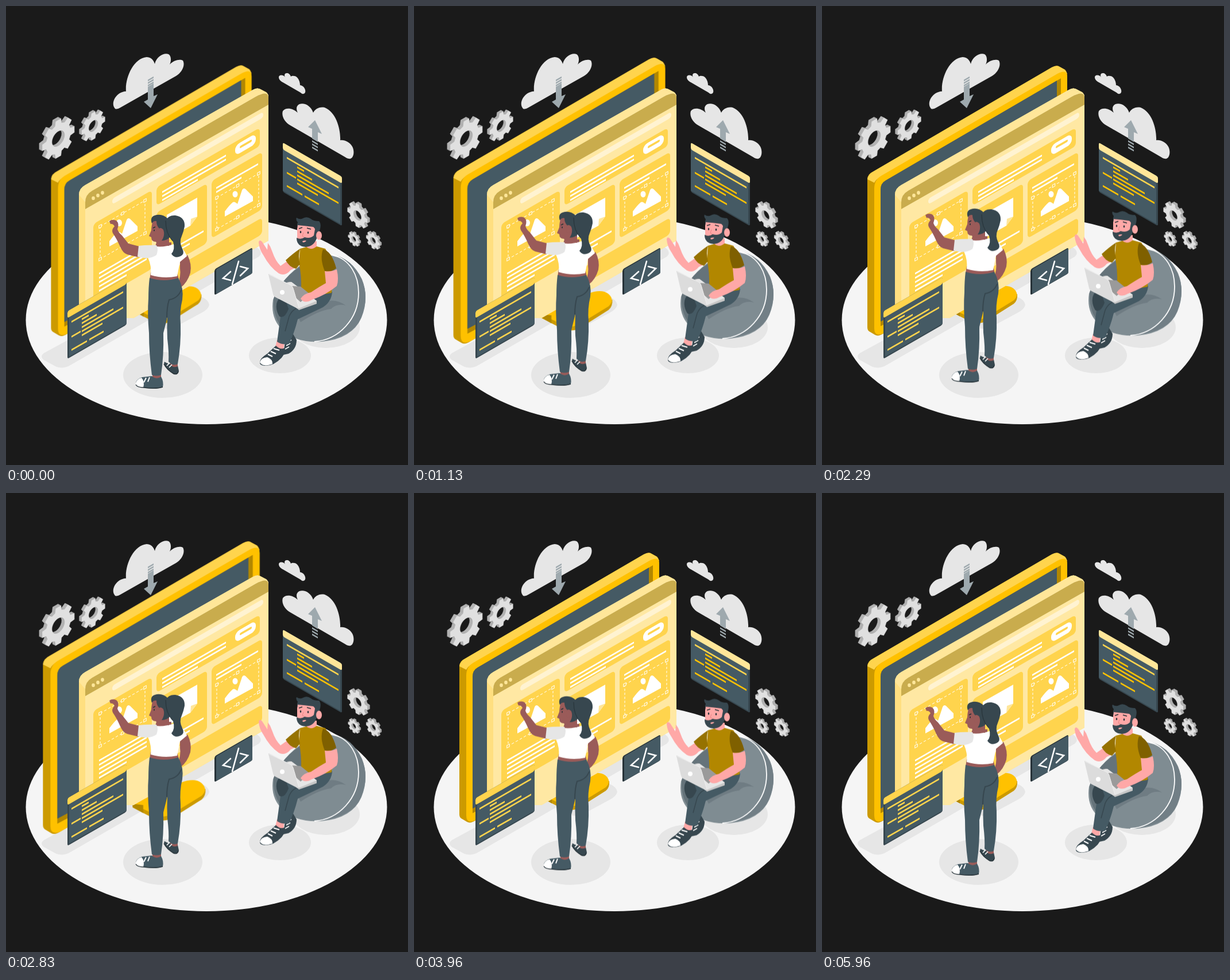
An HTML page that plays this animation: 700 px wide and 800 px high, repeating every 6 s.

```html
<!DOCTYPE html>
<html lang="en">
<head>
<meta charset="utf-8">
<title>Isometric web design scene</title>
<style>
  html, body { margin: 0; width: 100%; height: 100%; overflow: hidden; background: #1a1a1a; }
  svg { display: block; width: 700px; height: 800px; }
  #monitor { transform-origin: 253px 340px; }
</style>
</head>
<body>
<svg id="stage" viewBox="0 0 700 800"></svg>
<script>
const GOLD = '#ffc100', AMBER = '#ffd44d', CREAM = '#ffe699', DEEP = '#cc9a00', BROWN = '#b28700';
const SLATE = '#455a64', INK = '#37474f', NIGHT = '#263238', GREY = '#e6e6e6', WHITE = '#fff';
const SKIN = '#9a5b59', PINK = '#ffa8a7', TILT = 0.577;

const path = (d, fill) => `<path d="${d}" fill="${fill}"/>`;
const stroke = (d, color, w = 2, extra = '') =>
  `<path d="${d}" fill="none" stroke="${color}" stroke-width="${w}" ${extra}/>`;
const oval = (x, y, rx, ry, fill) => `<ellipse cx="${x}" cy="${y}" rx="${rx}" ry="${ry}" fill="${fill}"/>`;
const group = (id, ...parts) => `<g id="${id}">${parts.join('')}</g>`;

// A rectangle on a vertical isometric plane; dir -1 rises to the right, 1 falls.
const plane = (x, y, dir, inner) => `<g transform="matrix(1 ${dir * TILT} 0 1 ${x} ${y})">${inner}</g>`;
const slab = (x, y, w, h, r, fill, dir = -1) =>
  plane(x, y, dir, `<rect width="${w}" height="${h}" rx="${r}" fill="${fill}"/>`);
const bar = (x, y, w, fill = WHITE, h = 3) => slab(x, y, w, h, 0, fill);

function gear(cx, cy, r, dir, depth) {
  const at = (a, k) => {
    const u = Math.cos(a) * r * k, v = Math.sin(a) * r * k;
    return `${(u * 0.866).toFixed(1)} ${(v + dir * u * 0.5).toFixed(1)}`;
  };
  const rim = [];
  for (let i = 0; i < 8; i++) {
    const a = i * Math.PI / 4;
    [[-0.27, 0.77], [-0.17, 1], [0.17, 1], [0.27, 0.77]].forEach(([o, k]) => rim.push(at(a + o, k)));
  }
  const ring = k => Array.from({ length: 24 }, (_, i) => at(i * Math.PI / 12, k)).join('L');
  const body = `M${rim.join('L')}Z`, hole = `M${ring(0.38)}Z`;
  const shape = (dx, dy, fill) =>
    `<path transform="translate(${cx + dx} ${cy + dy})" d="${body}${hole}" fill="${fill}" fill-rule="evenodd" stroke="#8f8f8f" stroke-width=".4"/>`;
  let out = '';
  for (let i = 5; i >= 0; i--) out += shape(dir * depth * i / 5, -depth * i / 10, i ? '#c4c4c4' : '#e0e0e0');
  return out;
}

function frameBox(x, y, w, h) {
  let marks = '';
  for (const u of [0, 0.5, 1]) for (const v of [0, 0.5, 1])
    if ((u !== 0.5 || v !== 0.5) && (u === 0.5 || v !== 0.5))
      marks += `<rect x="${u * w - 2.2}" y="${v * h - 2.2}" width="4.4" height="4.4" fill="${AMBER}" stroke="#fff"/>`;
  return plane(x, y, -1,
    `<rect width="${w}" height="${h}" fill="none" stroke="#fff" stroke-dasharray="4 3"/>${marks}`);
}

// Column, drop and width of each code line.
const CODE = [[7, 9, 90], [25, 15, 12], [25, 22, 26], [25, 29, 55], [7, 35, 16],
  [25, 36, 72], [25, 43, 36], [7, 58, 27], [38, 58, 25]];
function codeWindow(x, y, dir, h, strip, lineColor) {
  return slab(x, y, 103, h, 3, INK, dir) +
    slab(x + (dir < 0 ? 3 : 0), y + 12 + (dir < 0 ? -2 : 0), 100, h - 14, 1, SLATE, dir) +
    slab(x, y, 103, 12, 3, strip, dir) +
    CODE.map(([cx, cy, w], i) => slab(x + cx, y + 12 + cy + dir * cx * TILT, w, 3, 0,
      i ? lineColor : AMBER, dir)).join('');
}

const ground = [
  oval(349, 547.5, 314.5, 181.5, '#f5f5f5'),
  path('M66 605L415 414Q428 413 441 424Q447 431 440 437L112 626Q100 633 88 629L66 617Q58 611 66 605Z', GREY),
  path('M245 545L330 505Q352 508 354 521Q352 529 340 535L292 561Q276 565 262 558Z', GREY),
  oval(273, 643, 69, 40, GREY), oval(477, 609, 54, 31, GREY), oval(557, 560, 59, 36, GREY)
].join('');

const ARROW = '#9ea9ae';
const sky = [
  path('M190 179C183 172 188 158 198 152C202 150 208 148 209 149C207 125 222 91 245 89C252 89 257 94 259 101C262 88 275 81 283 84C288 87 288 96 285 102C292 94 303 92 308 95C313 104 305 117 296 122L201 176Q193 181 190 179Z', GREY),
  path('M247 141L257 135V157L264 154L252 178L240 167L247 163Z', ARROW),
  ...[0, 5, 10].map(d => slab(247, 128.5 + d * 0.9, 10, 2.8, 0, ARROW)),
  path('M600 266C606 264 607 252 603 245C598 237 590 233 582 234C583 215 575 185 555 177C545 175 538 180 535 186C531 174 520 168 511 171C505 174 505 180 508 186C500 178 487 176 482 183C479 192 486 203 495 208L590 263Q596 267 600 266Z', GREY),
  path('M538 199L550 223L543 220V237L533 231V214L526 211Z', ARROW),
  ...[0, 5, 10].map(d => slab(533, 234 + d * 1.1, 10, 2.8, 0, ARROW, 1)),
  path('M518 153C523 152 522 144 517 140Q514 138 512 138C512 130 507 122 502 122Q498 121 496 123C494 117 489 116 486 118Q484 121 486 124C482 119 475 120 475 124C475 128 478 131 482 133L513 151Q516 154 518 153Z', GREY),
  gear(91, 231, 33, -1, 5), gear(152, 209, 24, -1, 4),
  gear(612, 365, 20.5, 1, 4), gear(605.5, 406.5, 11.5, 1, 2.5), gear(639, 409, 14, 1, 3)
].join('');

const monitor = group('monitor',
  path('M223 526V532L258 550Q270 556 285 550L334 519Q341 513 340 502Z', DEEP),
  path('M223 526L300 492Q322 484 333 492Q345 502 334 513L285 543Q270 550 258 543Z', GOLD),
  path('M223 526L240 528V541L223 531Z', BROWN),
  path('M79 302Q79 293 90 288L400 107Q409 102 414 106L423 111Q427 114 427 122V386L108 570Q98 577 92 573L82 567Q79 565 79 560Z', DEEP),
  path('M79 302Q80 293 90 288L400 107Q409 102 414 106L423 111L427 118L412 119L102 298Q94 302 91 308Z', AMBER),
  path('M91 318Q91 303 103 296L410 118Q427 109 427 123V386L108 570Q91 578 91 562Z', GOLD),
  path('M102 320Q102 309 111 304L416 126V392L102 558Z', BROWN),
  path('M102 320Q102 309 111 304L409 130V388L102 550Z', SLATE));

const mountain = (x, y) => path(
  `M${x} ${y}V${y - 9}Q${x + 8} ${y - 20} ${x + 14} ${y - 25}Q${x + 17} ${y - 27} ${x + 22} ${y - 22}L${x + 30} ${y - 46}Q${x + 32} ${y - 51} ${x + 36} ${y - 48}L${x + 49} ${y - 35}V${y - 27}Z`, WHITE);

const panel = [
  path('M127 329Q127 318 138 312L430 146Q438 141 445 146L453 150Q457 153 457 160V409L222 544L138 540L127 530Z', '#ffdf80'),
  path('M127 329Q127 318 138 312L430 146Q438 141 445 146L455 152L435 160L150 324Q138 331 138 342Z', CREAM),
  path('M138 342Q139 329 150 322L437 156Q455 147 457 156V409L222 544H138Z', '#ffe8a3'),
  path('M138 354V342Q138 329 150 322L435 158Q457 146 457 160V172Z', '#c9ac4d'),
  ...[0, 1, 2].map(i => oval(152 + i * 8, 335 - i * 4.7, 2.8, 3.3, CREAM)),
  slab(185, 336, 263, 10, 5, '#fff3d1'),
  slab(152, 380, 102, 137, 6, AMBER),
  slab(262, 316, 180, 32, 6, AMBER),
  slab(262, 360, 88, 104, 6, AMBER),
  slab(358, 305, 88, 100, 6, AMBER),
  slab(262, 475, 184, 29, 6, AMBER),
  bar(272, 323, 111), bar(272, 330, 111), bar(272, 337, 62),
  slab(399, 243, 36, 18, 8, WHITE), slab(407, 244.5, 21, 4, 2, AMBER),
  bar(366, 316, 73), bar(366, 323, 44),
  frameBox(367, 334, 73, 55), mountain(381, 367), oval(399, 328, 4.5, 5.5, WHITE),
  frameBox(164, 384, 78, 57), mountain(180, 419), oval(197, 378, 5, 6, WHITE),
  path('M280 364L333 334V367L321 383L280 406Z', WHITE),
  path('M321 383L322 371L333 367Z', CREAM),
  bar(304, 414, 40), bar(290, 430, 30),
  ...[0, 1, 2, 3, 4].map(i => bar(162, 465 + i * 7.5, i === 4 ? 48 : 83))
].join('');

const windows = codeWindow(107, 532, -1, 83, AMBER, AMBER) + codeWindow(482, 238, 1, 86, CREAM, GOLD) +
  slab(363, 459, 66, 45, 3, NIGHT) + slab(366, 459, 63, 43, 2, SLATE) +
  stroke('M391 463L378 474.5L391 478M394 485L405 445M408 454L421 457.5L408 470', WHITE, 2.6, 'stroke-linecap="round"');

const woman = group('woman',
  path('M276 620Q284 626 298 622L301 636Q300 643 292 641Q279 634 275 623Z', INK),
  path('M285 617H298L299 628Q290 632 286 624Z', SKIN),
  stroke('M280 627L285 622M284 630L289 625', WHITE, 1.7),
  stroke('M275 624Q280 634 292 641Q299 643 300 637', NIGHT, 1.5),
  path('M255 637H270V652Q261 654 255 648Z', SKIN),
  path('M226 657Q227 650 237 647L254 645Q262 652 270 646Q275 655 273 664Q262 669 243 665Q226 665 226 657Z', SLATE),
  path('M226 657Q228 650 236 648Q242 654 239 665Q225 664 226 657Z', WHITE),
  stroke('M240 656L244 648M247 655L250 647', WHITE, 2),
  stroke('M226 660Q229 665 240 665Q261 668 273 664', NIGHT, 1.4),
  path('M303 440L316 434Q324 450 321 465Q316 482 304 491L299 485Q305 470 303 458Z', SKIN),
  path('M252 464H298L301 477Q276 485 250 477Z', SKIN),
  path('M250 474Q275 482 300 474Q310 492 307 512Q302 532 304 555Q305 590 299 624Q290 628 283 620Q284 605 281 580Q280 560 281 542L274 570Q275 610 270 643Q262 646 254 643Q249 605 249 570Q246 535 248 510Q248 490 250 474Z', SLATE),
  stroke('M305 495Q300 509 284 512Q280 525 280 543', INK, 2),
  path('M180 375Q185 371 192 374Q198 379 194 389Q196 395 202 400L213 414L236 420L231 438L211 433Q204 431 199 420Q193 406 186 396Q183 390 189 384Q186 379 182 380Z', SKIN),
  path('M262 412H288V425Q272 431 259 422Z', SKIN),
  path('M254 418Q273 422 292 415Q308 418 315 436L303 446Q301 456 298 471Q275 476 252 469Q254 454 247 438Q252 430 254 418Z', WHITE),
  path('M231 418Q246 416 262 417Q266 424 262 434Q250 443 229 437Z', GREY),
  path('M256 372Q253 384 253 391L249 401L253 403Q253 411 261 411L266 418H284L284 386L276 371Z', SKIN),
  path('M254 379Q250 368 259 365Q272 361 282 371L286 402Q281 409 271 409Q276 402 275 394Q274 386 267 388Q262 383 262 375Q257 374 254 379Z', INK),
  path('M278 374Q283 364 295 365Q312 368 311 384Q309 394 306 401Q301 411 307 423Q312 432 304 436Q294 441 288 432Q295 424 291 411Q280 400 278 374Z', INK),
  oval(269, 394, 4.8, 7, SKIN),
  stroke('M278 374Q278 397 290 409', NIGHT, 1),
  stroke('M256 387L260 385', NIGHT, 1.5), oval(258, 391, 1, 1.5, NIGHT));

const man = group('man',
  path('M555 433Q600 438 619 475Q633 508 619 543Q603 580 550 585Q505 588 482 565Q460 545 465 512Q480 473 520 447Z', '#7f8c92'),
  path('M568 433Q603 440 620 477Q633 509 618 544Q603 580 537 585C580 582 614 545 614 500C614 470 600 442 568 433Z', '#727f86'),
  path('M466 510Q480 472 520 450L545 500L508 540L494 572Q464 553 466 510Z', '#65737a'),
  path('M592 522Q570 506 545 520L510 545L513 551Q545 530 566 528Q576 518 592 522Z', '#6f7c83'),
  stroke('M568 433C600 442 614 470 614 500C614 545 580 582 537 585', WHITE, 1.8),
  path('M487 576L500 572L506 582Q506 598 492 606L483 608Z', INK),
  stroke('M488 592L495 588M486 598L493 594M490 586L497 582', WHITE, 1.6),
  path('M472 582H485L483 600Q474 600 469 594Z', PINK),
  path('M442 621Q442 614 455 606L470 592Q478 600 485 596Q488 603 480 613Q466 628 450 627Q441 626 442 621Z', INK),
  path('M442 621Q444 613 455 612Q465 616 464 624Q447 630 442 621Z', WHITE),
  stroke('M456 607L464 611M461 602L470 606M466 597L476 600', WHITE, 2),
  path('M495 520Q545 500 568 498Q567 515 552 525Q525 538 508 546Q502 570 493 589Q480 591 472 585L478 541Q466 525 474 511Z', SLATE),
  path('M475 511Q466 524 476 541Q485 546 492 528L486 510Z', INK),
  stroke('M514 526Q500 525 493 541L486 567', INK, 1.5),
  path('M492 443L478 453Q469 444 464 429L460 419L456 413L455 425L446 411Q441 406 440 412Q441 424 448 434Q459 455 475 466Q486 472 496 460L505 456Z', PINK),
  path('M523 410H541V425Q532 434 522 424Z', PINK),
  path('M512 423L523 420Q531 427 541 419L556 423Q571 445 567 500Q540 506 514 496Q515 470 510 447Z', BROWN),
  path('M512 423Q500 431 487 443Q493 455 505 458L512 450Q508 437 512 423Z', '#967200'),
  path('M552 424Q567 427 575 457Q568 464 555 462Q546 440 552 424Z', '#7f6000'),
  path('M507 381Q521 376 540 382V404Q536 417 523 418Q508 417 507 405Z', PINK),
  path('M506 404Q513 408 520 403Q530 406 536 400L538 389H541V405Q536 419 522 420Q506 419 506 404Z', INK),
  path('M508 388Q506 382 508 377Q504 372 506 369Q512 373 517 370Q524 366 531 371Q535 375 545 375Q550 380 546 392L539 396Q540 389 535 385Q520 383 508 382Z', INK),
  oval(545, 400, 5, 7.5, PINK),
  oval(513, 394, 1.3, 1.9, NIGHT), oval(526, 395, 1.3, 1.9, NIGHT),
  stroke('M510 388L516 386M524 387L531 389', NIGHT, 1.5),
  stroke('M518 395L516 401L519 402', '#e88486', 1),
  path('M516 410Q520 408 523 409Q521 412 517 412Z', PINK),
  path('M487 483Q491 480 497 481L541 514V519L510 530L499 519Z', '#c7c7c7'),
  path('M488 485Q492 481 497 481L541 514L510 527Z', GREY),
  path('M498 488L513 489L529 502L513 516L504 508Z', '#9a9a9a'),
  path('M555 462Q565 464 576 459Q580 477 576 488Q558 503 533 512Q519 520 513 510Q519 501 531 499Q546 489 557 483Z', PINK),
  path('M457 468Q456 466 460 468L495 486Q499 488 500 492L510 526Q508 529 505 526L470 508Q466 506 465 502Z', '#dcdcdc'),
  stroke('M458 468L495 486Q499 488 500 492L510 526', '#f0f0f0', 1),
  oval(481, 499, 4, 4, WHITE));

const stage = document.getElementById('stage');
stage.innerHTML = ground + sky + monitor + panel + windows + woman + man;

const LOOP = 6000;
// Time in ms and scale of the double pulse.
const PULSE = [[0, 1.003], [600, 1.1], [710, 1.091], [1250, 1.051], [1580, 1.013], [1820, 1], [2370, 1],
  [2500, 1.026], [2830, 1.084], [2970, 1.1], [3130, 1.07], [3620, 1], [5970, 1], [LOOP, 1.003]];
const timing = { duration: LOOP, iterations: Infinity };
const clips = [
  document.getElementById('monitor').animate(
    PULSE.map(([t, s]) => ({ offset: t / LOOP, transform: `scale(${s})` })), timing),
  ...['woman', 'man'].map(id => document.getElementById(id).animate(
    [0, -14, 0].map(y => ({ transform: `translateY(${y}px)` })), timing))
];
const start = document.timeline.currentTime || 0;
clips.forEach(clip => { clip.startTime = start; });
</script>
</body>
</html>
```
